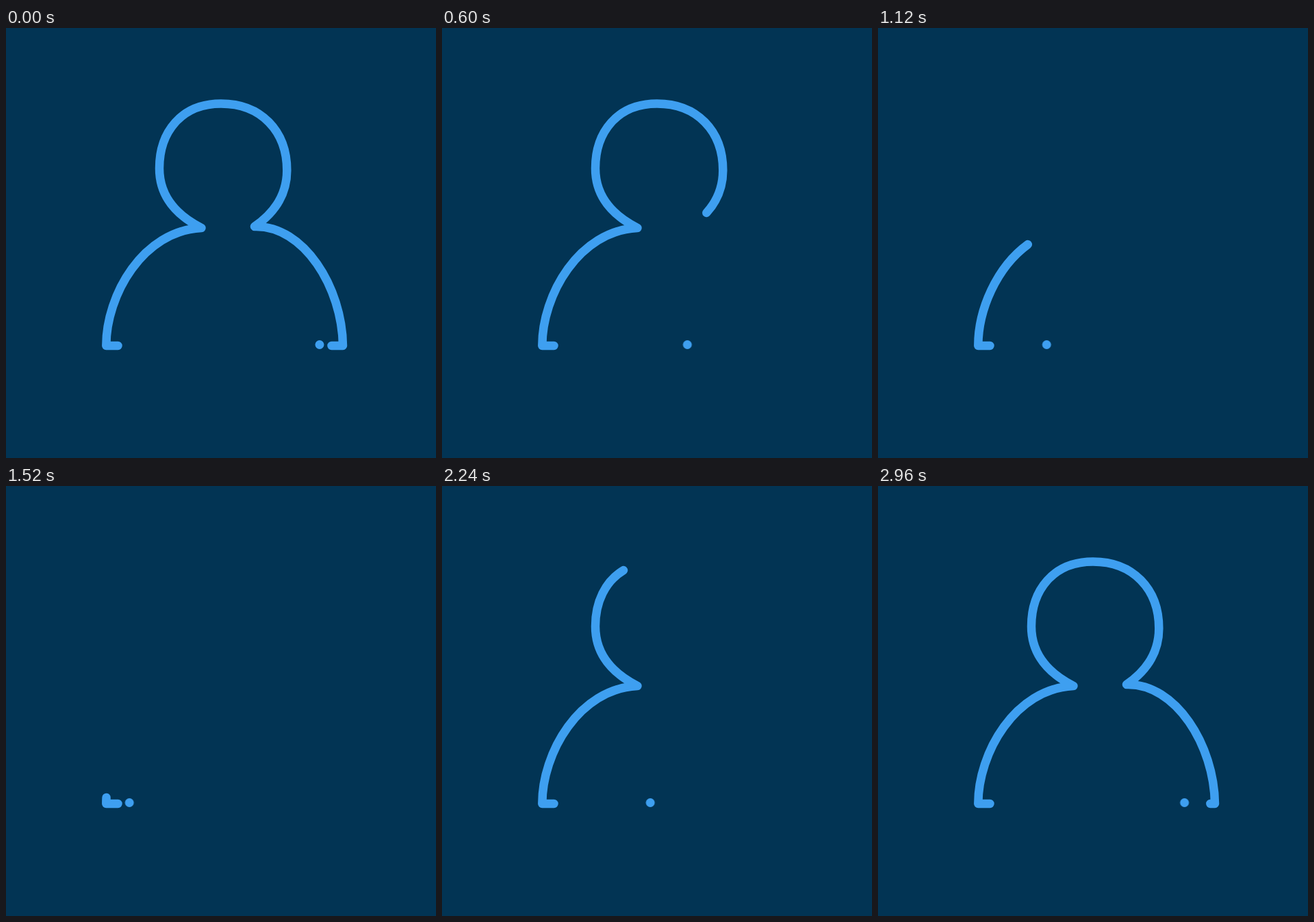
Write an HTML page without scripts that moves like this. It is 628x628 px and loops after 3 s.

```html
<!DOCTYPE html>
<html lang="en">
<head>
<meta charset="utf-8">
<title>User outline</title>
<style>
  html, body { margin: 0; width: 100%; height: 100%; overflow: hidden; background: #023454; }
  svg { display: block; width: 100vw; height: 100vh; }

  .line {
    fill: none;
    stroke: #3e9ff0;
    stroke-width: 12.5;
    stroke-linecap: round;
    stroke-linejoin: round;
    stroke-dasharray: 1030 2000;
    animation: retract 3s infinite;
  }
  .dot { fill: #3e9ff0; animation: slide 3s infinite; }

  /* Out and back along the same curve; the way back mirrors each easing. */
  @keyframes retract {
    0%       { stroke-dashoffset: 0;    animation-timing-function: cubic-bezier(.333, 0, .667, .34); }
    4%       { stroke-dashoffset: 10;   animation-timing-function: cubic-bezier(.333, .131, .667, .523); }
    13.333%  { stroke-dashoffset: 127.5; animation-timing-function: cubic-bezier(.333, .27, .667, .584); }
    18.667%  { stroke-dashoffset: 246;  animation-timing-function: cubic-bezier(.333, .275, .667, .651); }
    26.667%  { stroke-dashoffset: 515;  animation-timing-function: cubic-bezier(.333, .384, .667, .742); }
    37.333%  { stroke-dashoffset: 841;  animation-timing-function: cubic-bezier(.333, .676, .667, 1); }
    51.333%  { stroke-dashoffset: 1004; animation-timing-function: cubic-bezier(.333, 0, .667, .324); }
    65.333%  { stroke-dashoffset: 841;  animation-timing-function: cubic-bezier(.333, .258, .667, .616); }
    76%      { stroke-dashoffset: 515;  animation-timing-function: cubic-bezier(.333, .349, .667, .725); }
    84%      { stroke-dashoffset: 246;  animation-timing-function: cubic-bezier(.333, .416, .667, .73); }
    89.333%  { stroke-dashoffset: 127.5; animation-timing-function: cubic-bezier(.333, .477, .667, .869); }
    98.667%  { stroke-dashoffset: 10;   animation-timing-function: linear; }
    100%     { stroke-dashoffset: 4.5; }
  }
  @keyframes slide {
    0%       { transform: translateX(458px);   animation-timing-function: cubic-bezier(.333, 0, .667, .476); }
    4%       { transform: translateX(447.5px); animation-timing-function: cubic-bezier(.333, .257, .667, .655); }
    13.333%  { transform: translateX(397.5px); animation-timing-function: cubic-bezier(.333, .323, .667, .642); }
    18.667%  { transform: translateX(367px);   animation-timing-function: cubic-bezier(.333, .304, .667, .663); }
    26.667%  { transform: translateX(313px);   animation-timing-function: cubic-bezier(.333, .365, .667, .695); }
    37.333%  { transform: translateX(246.5px); animation-timing-function: cubic-bezier(.333, .4, .667, 1); }
    51.333%  { transform: translateX(180px);   animation-timing-function: cubic-bezier(.333, 0, .667, .6); }
    65.333%  { transform: translateX(246.5px); animation-timing-function: cubic-bezier(.333, .305, .667, .635); }
    76%      { transform: translateX(313px);   animation-timing-function: cubic-bezier(.333, .337, .667, .696); }
    84%      { transform: translateX(367px);   animation-timing-function: cubic-bezier(.333, .358, .667, .677); }
    89.333%  { transform: translateX(397.5px); animation-timing-function: cubic-bezier(.333, .345, .667, .743); }
    98.667%  { transform: translateX(447.5px); animation-timing-function: linear; }
    100%     { transform: translateX(452.5px); }
  }
</style>
</head>
<body>
<svg viewBox="0 0 628 628">
  <path class="line" pathLength="1030" d="M163.5 464H146.3
    C146.3 390 200 296 285.5 292
    C248 273 224 246 224 205
    C224 152 256 110.5 314 110.5
    C372 110.5 410.3 150 410.3 208
    C410.3 244 392 270 363 290
    C435 288 491 379 492 464
    H475.5"/>
  <circle class="dot" cy="462.5" r="6.5"/>
</svg>
</body>
</html>
```
